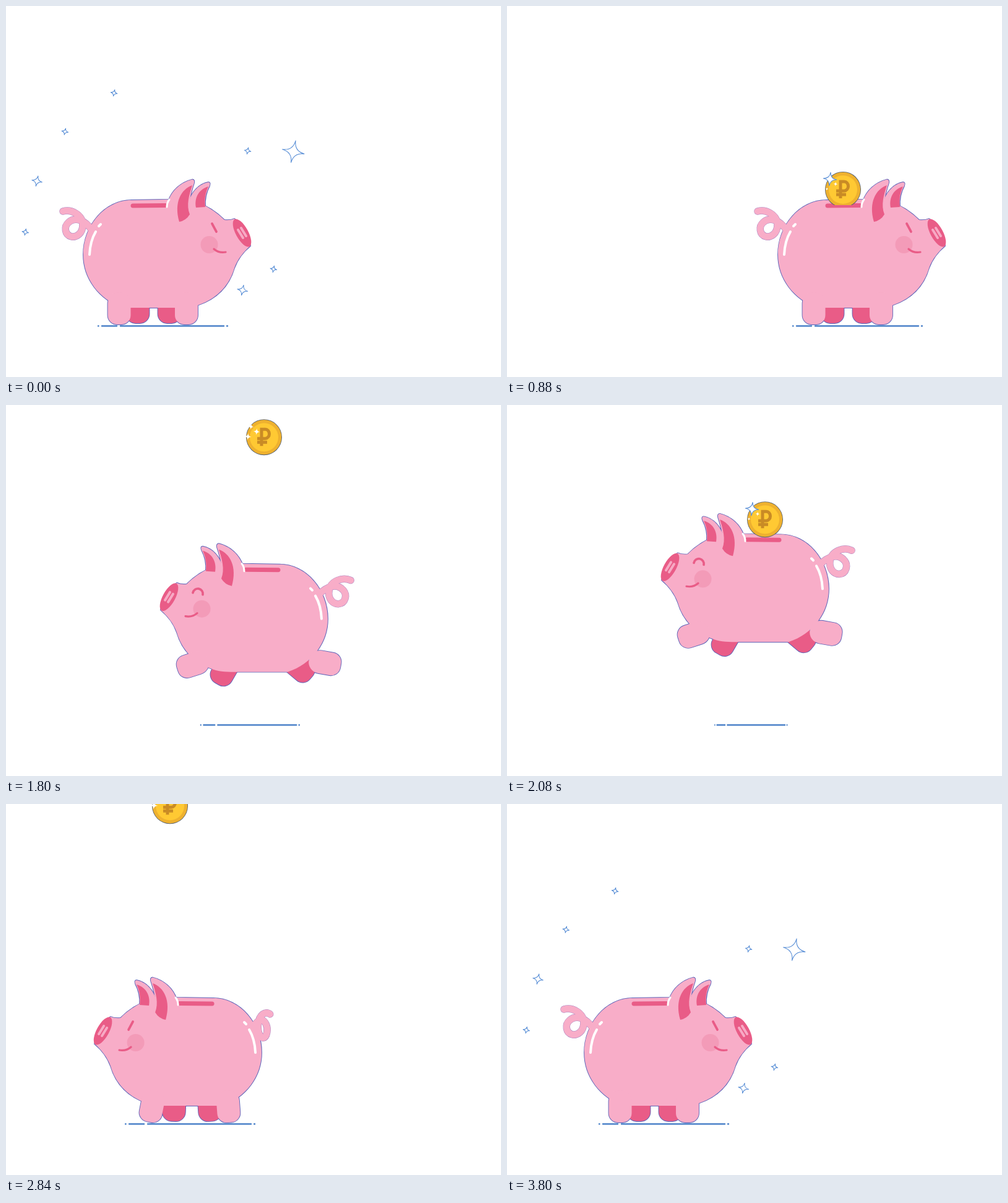
An HTML page with a canvas that plays this animation: 800 by 600 pixels, repeating every 3840 ms.

```html
<!DOCTYPE html>
<html lang="en">
<head>
<meta charset="utf-8">
<title>Piggy bank</title>
<style>
html, body { margin: 0; width: 100%; height: 100%; overflow: hidden; background: #fff; }
canvas { display: block; }
</style>
</head>
<body>
<canvas id="stage" width="800" height="600"></canvas>
<script>
const ctx = document.getElementById('stage').getContext('2d');
const LOOP = 3840, STEP = 40, END = 3800;
const PINK = '#f8adc8', DARK = '#e95c87', EDGE = '#5b62b8', BLUE = '#4c82c9';
const HOME = 247, SPEED = .475;
const { sin, cos, exp, min, max, PI } = Math;

const P = d => new Path2D(d);
const rad = deg => deg * PI / 180;
const part = (t, a, b) => min(1, max(0, (t - a) / (b - a)));
const ease = u => (1 - cos(PI * u)) / 2;

// Pig outline, facing right, body centre at x = HOME
const body = P('M203 314L262 313C290 308 325 318 353 346Q362 347 369 344C380 352 393 370 395 388C384 397 374 410 369 424C362 448 345 472 310 484C300 488 285 488 270 488L190 488C150 475 125 440 125 402C125 355 160 314 203 314Z');
const farEar = P('M295 318C300 300 312 288 327 285Q331 285 329 291C323 302 321 312 322 325L300 330Z');
const nearEar = P('M262 316C268 298 283 285 301 280.5Q306 281 303.5 288C298 304 295 320 298 337L280 349Z');
const farInner = P('M327 292C312 296 304 310 307 326L322 325C320 312 323 300 327 292Z');
const nearInner = P('M301 290C283 296 271 318 280 349Q291 347 297 337C291 322 296 305 301 290Z');
const tailCurve = P('M92 332C106 328 124 338 124 354C124 368 114 374 106 373C94 370 94 356 101 350C112 340 128 346 140 364');
const rouble = P('M-4 14V-13H2A6.5 7.5 0 0 1 2 2H-11M-11 8H5');

// Resting foot, and how far the leg swings in a stride and in a jump (degrees)
const legs = [
  { x: 183, y: 515, stride: 21, jump: 80 },
  { x: 291.5, y: 515, stride: -55, jump: -72 },
  { x: 213, y: 513, stride: 20, jump: 50 },
  { x: 264, y: 513, stride: -12, jump: -30 }
];
const walks = [
  { start: 0, end: 740, dx: 313 },
  { start: 1090, end: 1680, dx: -162 },
  { start: 2458, end: 3058, dx: -151 }
];

// Each coin falls into the slot at time `at`, then sets off stars around (x, y)
const coins = [
  { x: 543, at: 935, land: 323, y: 300, rot: 32, spin: -.083 },
  { x: 417, at: 2206, land: 245, y: 224, rot: 32, spin: -.01 },
  { x: 265, at: 3490, land: 312, y: 310, rot: 24, spin: -.039 }
];

// Stars as angle from the top, distance, size: a fan on the left, four on the right
const stars = [[47, 155, 6.5], [57.6, 225, 21], [112.7, 215, 6.5], [130, 201, 10]];
for (let i = 0; i < 4; i++)
  stars.push([-40 - 32 * i + 2.3 * i * i, 203 + 5 * i + 4 * i * i, i === 2 ? 10 : 6.5]);

function pigState(t) {
  let x = HOME, step = 0, effort = 0;
  for (const w of walks) {
    const u = part(t, w.start, w.end);
    const pace = min(1, 3 * sin(PI * u));
    x += w.dx * ease(u);
    step += pace * cos(5.6 * PI * u);
    effort += pace;
  }
  const air = part(t, 1678, 2442);
  const landing = part(air, .6, 1);
  return {
    x, effort,
    up: 420 * air * (1 - air),
    step: step < 0 ? step * .35 : step,
    splay: min(1, air / .15) * (1 - ease(landing)),
    stretch: 17 * sin(PI * landing),
    facing: cos(PI * (part(t, 940, 1090) - part(t, 3560, 3720))),
    happy: air > .03 && air < .7
  };
}

function line(path, color, width) {
  ctx.strokeStyle = color;
  ctx.lineWidth = width;
  ctx.stroke(path);
}

function fill(path, color) {
  ctx.fillStyle = color;
  ctx.fill(path);
}

function disc(x, y, r, color) {
  const p = new Path2D();
  p.arc(x, y, r, 0, 2 * PI);
  fill(p, color);
}

function placed(path, matrix) {
  const out = new Path2D();
  out.addPath(path, matrix);
  return out;
}

function star(x, y, r, rot, outline) {
  ctx.save();
  ctx.translate(x, y);
  ctx.rotate(rot);
  const k = r * .06;
  const p = new Path2D();
  p.moveTo(0, -r);
  p.quadraticCurveTo(k, -k, r, 0);
  p.quadraticCurveTo(k, k, 0, r);
  p.quadraticCurveTo(-k, k, -r, 0);
  p.quadraticCurveTo(-k, -k, 0, -r);
  p.closePath();
  fill(p, '#fff');
  if (outline) line(p, '#5189d4', 1);
  ctx.restore();
}

function drawBurst(c, t) {
  const age = (t - c.at + END) % END;
  const size = min(1, age / 100) * (1 - part(age, 150, 600) ** 2);
  if (size <= 0) return;
  const spread = 1.083 * (1 - exp(-age / 150));
  const rot = rad(c.rot + c.spin * age);
  for (const [deg, dist, r] of stars) {
    const a = rad(deg) + rot, d = dist * spread;
    star(c.x + d * sin(a), c.y - d * cos(a), r * size, rot, true);
  }
}

function drawCoin(c, t, pig) {
  const y = c.land + SPEED * (t - c.at), slot = 322 - pig.up;
  if (y < -32 || y > slot + 30) return;
  ctx.save();
  ctx.beginPath();
  ctx.rect(0, 0, 800, slot);
  ctx.clip();
  ctx.translate(c.x, y);
  disc(0, 0, 29, '#4d5a70');
  disc(0, 0, 28.2, '#eeb12f');
  disc(0, 0, 23, '#ffc933');
  ctx.lineCap = 'butt';
  line(rouble, '#c98b25', 5);
  const glint = min(11, max(3, 2 + y / 20));
  star(-21, -17, glint, .1, glint > 7);
  star(-26, -1, 8 - glint / 2, .1);
  star(-12, -9, 6.5 - glint / 4, .1);
  ctx.restore();
}

function legShape(leg, pig) {
  const deg = leg.stride * pig.step + leg.jump * pig.splay + Math.sign(leg.jump) * pig.stretch * .3;
  const a = rad(deg), shape = new Path2D();
  shape.roundRect(-18.5, -52, 37, 52, [18, 18, 15, 15]);
  const x = leg.x - 80 * sin(a);
  const y = leg.y - 45 * (1 - cos(a)) + pig.stretch;
  return placed(shape, new DOMMatrix().translate(x, y).rotate(deg));
}

function drawPig(pig) {
  const [nearRear, nearFront, farRear, farFront] = legs.map(l => legShape(l, pig));
  const squash = 1 + pig.effort * (.28 * pig.facing - .17);
  const tail = placed(tailCurve, new DOMMatrix().translate(140, 362)
    .scale(squash, 1).rotate(-4.5 * (1 - pig.facing)).translate(-140, -362));

  ctx.save();
  ctx.translate(pig.x, -pig.up);
  ctx.scale(pig.facing, 1);
  ctx.translate(-HOME, 0);
  ctx.lineCap = ctx.lineJoin = 'round';

  for (const p of [body, farEar, nearEar, nearRear, nearFront, farRear, farFront]) line(p, EDGE, 1.8);
  line(tail, '#a982c0', 11.5);
  line(tail, PINK, 10.5);
  for (const p of [farRear, farFront]) fill(p, DARK);
  for (const p of [farEar, body, nearRear, nearFront]) fill(p, PINK);
  fill(farInner, DARK);
  line(P('M205 323L257 322.5'), DARK, 7);
  fill(nearEar, PINK);
  fill(nearInner, DARK);

  line(P('M260 325Q260 318 264 313'), '#fff', 3);
  line(P('M135 402Q136 380 145 365M150 356L153 353'), '#fff', 4);
  disc(328.5, 386, 14, '#f39bb8');
  line(P('M336 393Q344 400 355 398'), DARK, 3.2);
  line(P(pig.happy ? 'M327 363A8 8 0 0 1 343 360' : 'M333 352L340 365'), DARK, 3.7);

  const snout = new Path2D();
  snout.ellipse(381.5, 367, 10, 25, -.5, 0, 2 * PI);
  fill(snout, DARK);
  line(P('M375 362L383 375M380 359L388 372'), '#f7a9c4', 4);
  ctx.restore();
}

function drawShadow(pig) {
  ctx.save();
  ctx.translate(pig.x + 6 - min(10, pig.up * .25), 517.5);
  ctx.scale(1 - .0042 * pig.up, 1);
  ctx.lineCap = 'round';
  line(P('M-104 0H-103.5M-98 0H-74M-68 0H99M104 0H105'), BLUE, 2.4);
  ctx.restore();
}

function draw(time) {
  const t = Math.floor(time / STEP) * STEP % END;
  const pig = pigState(t);
  ctx.fillStyle = '#fff';
  ctx.fillRect(0, 0, 800, 600);
  coins.forEach(c => drawBurst(c, t));
  drawShadow(pig);
  drawPig(pig);
  coins.forEach(c => drawCoin(c, t, pig));
}

const start = performance.now();
function tick() {
  draw((performance.now() - start) % LOOP);
  requestAnimationFrame(tick);
}
tick();
</script>
</body>
</html>
```
